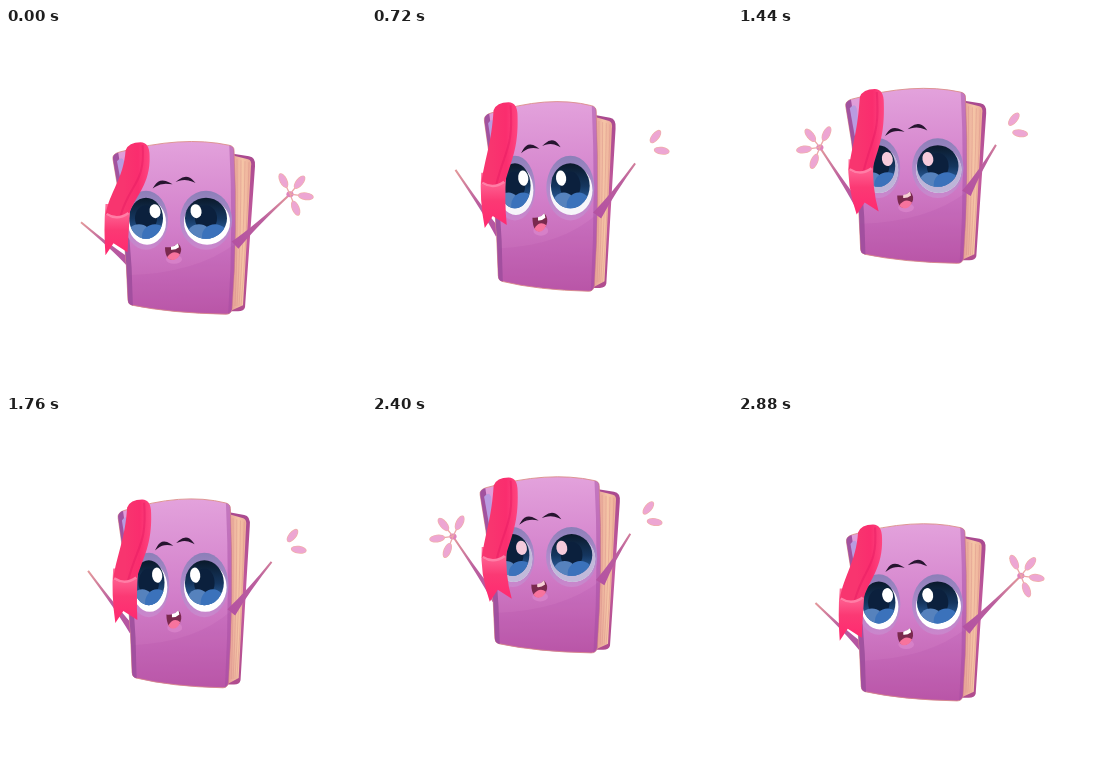
These frames come from a looping animation (360x360 px, 2960 ms). An HTML page with a canvas:

```html
<!DOCTYPE html>
<html lang="en">
<head>
<meta charset="utf-8">
<title>Bouncing book</title>
<style>
  html, body { margin: 0; width: 100%; height: 100%; overflow: hidden; background: #fff; }
  canvas { display: block; width: 100vmin; height: 100vmin; }
</style>
</head>
<body>
<canvas id="stage"></canvas>
<script>
const canvas = document.getElementById('stage');
const ctx = canvas.getContext('2d');
const density = Math.max(1, window.devicePixelRatio || 1);
canvas.width = canvas.height = 360 * density;

const LOOP = 2960, STEP = 80, BOUNCES = 3, TAU = Math.PI * 2;

function gradient(x0, y0, x1, y1, ...colors) {
  const g = ctx.createLinearGradient(x0, y0, x1, y1);
  colors.forEach((c, i) => g.addColorStop(i / (colors.length - 1), c));
  return g;
}

function shape(d, fill, stroke, width = 1) {
  const path = new Path2D(d);
  if (fill) { ctx.fillStyle = fill; ctx.fill(path); }
  if (stroke) { ctx.strokeStyle = stroke; ctx.lineWidth = width; ctx.stroke(path); }
}

function oval(x, y, rx, ry, fill, angle = 0) {
  ctx.beginPath();
  ctx.ellipse(x, y, rx, ry, angle, 0, TAU);
  ctx.fillStyle = fill;
  ctx.fill();
}

function eye(x, rx, lightX, dim) {
  oval(x, 192, rx, 29.5, gradient(0, 162, 0, 222, '#8b7fb8', '#ae8bcb', '#cc86cc'));
  oval(x + 1, 194, rx - 3, 22.5, '#fff');
  ctx.globalAlpha = dim * .8;
  oval(x + 1, 194, rx - 3, 22.5, '#aaa0cd');
  ctx.globalAlpha = 1;
  ctx.save();
  ctx.beginPath();
  ctx.ellipse(x, 190, rx - 5, 20.5, 0, 0, TAU);
  ctx.clip();
  ctx.fillStyle = gradient(0, 170, 0, 211, '#0a1a2c', '#15365f', '#3470b8');
  ctx.fillRect(x - 30, 165, 60, 50);
  oval(x, 190, 11, 13, '#0b203d');
  oval(x - 7, 207, 12, 11, '#5682bd');
  oval(x + 9, 208, 13, 12, '#3b72bb');
  ctx.restore();
  oval(lightX, 183, 5.5, 7, dim > .4 ? '#f6cbdc' : '#fff', -.2);
}

function pages() {
  shape('M224 125 L243 128 Q250 129 249 138 L239 279 Q238 283 232 283 L222 283Z',
    gradient(0, 125, 0, 283, '#a9498f', '#c45b9e', '#b04c8e'));
  shape('M226 127 L242 131 Q246 132 245 138 L237 277 L226 282Z',
    gradient(226, 0, 247, 0, '#e59f97', '#f5c5a6', '#eaa695'));
  for (let i = 0; i < 4; i++)
    shape(`M${231 + i * 4} ${131 + i} Q${232 + i * 3} 210 ${229 + i * 2} 278`, null, '#d58a8488', .7);
}

function cover() {
  const outline = 'M113 124 Q176 107 223 117 Q228 118 228 122 Q232 202 226 281 Q225 286 220 286 ' +
    'Q165 285 126 277 Q122 276 122 272 Q120 200 107 131 Q106 126 113 124Z';
  shape(outline, gradient(180, 113, 185, 286, '#e3a2dc', '#d27fca', '#bc59a9'), '#dc8f8a', .9);
  ctx.save();
  ctx.clip(new Path2D(outline));
  shape('M105 125 L112 123 Q126 200 127 280 L120 280 Q120 195 105 125Z', '#a1529f');
  shape('M111 133 Q116 127 118 133 L121 160 L116 160Z', '#b99be0');
  shape('M122 247 Q190 245 230 215 L230 290 L122 282Z', '#a7419f22');
  shape('M223 112 Q228 200 222 288 L235 288 L232 112Z', '#a04a9f77');
  ctx.restore();
}

function face(dim) {
  eye(140, 22, 149, dim);
  eye(200, 26, 190, dim);
  shape('M149 158 Q154 150 163 155 Q155 154 149 158Z', '#26152f', '#26152f', 1.4);
  shape('M173 152 Q181 146 187 153 Q180 150 173 152Z', '#26152f', '#26152f', 1.4);
  oval(168, 231, 8, 4.5, '#d680c8');
  shape('M159 219 Q167 220 172 215 Q177 220 174 226 Q168 234 162 230 Q159 226 159 219Z', '#7a294e');
  shape('M161 229 Q167 221 174 226 Q170 234 163 231Z', '#f7739d');
  shape('M165 218.5 Q169 218 172 215 L173 219 Q169 222 165 221.5Z', dim > .4 ? '#f6d0d5' : '#fff');
}

// Limb that narrows from the shoulder toward the hand
function arm(sx, sy, hx, hy, reach, thick) {
  const dx = hx - sx, dy = hy - sy, len = Math.hypot(dx, dy);
  const nx = -dy / len, ny = dx / len;
  const ex = sx + dx * reach, ey = sy + dy * reach;
  const mx = sx + dx * .35, my = sy + dy * .35;
  shape(`M${sx + nx * thick} ${sy + ny * thick} Q${mx + nx} ${my + ny} ${ex + nx} ${ey + ny}
    L${ex - nx} ${ey - ny} Q${mx - nx} ${my - ny} ${sx - nx * thick} ${sy - ny * thick}Z`,
    gradient(sx, sy, hx, hy, '#b452a2', '#bb5f9e', '#e49a9b'));
}

// Petal-like fingers fanned around the palm; side is 1 for right, -1 for left
function hand(x, y, side, first, count) {
  if (count > 3) oval(x, y, 3.6, 3, '#df83bd');
  for (let i = first; i < first + count; i++) {
    const angle = -2 + i * 1.07;
    const dx = Math.cos(angle) * side * 16, dy = Math.sin(angle) * 15;
    const tilt = Math.atan2(dy, dx);
    if (count > 3) shape(`M${x} ${y} l${dx * .6} ${dy * .6}`, null, '#eba7a8', 1.3);
    oval(x + dx, y + dy, 8, 3.9, '#f0b0a6', tilt);
    oval(x + dx, y + dy, 7.3, 3.2, '#eda6d3', tilt);
  }
}

function ribbon(top, bendX, endX, length) {
  const y = top + 4, midY = y + length * .36, bendY = y + length * .68, endY = y + length;
  const x = 131.5 + (bendX - 111) * .2, midX = bendX + 9;
  // Lower piece hangs behind the upper one
  shape(`M${bendX - 12} ${bendY - 14} Q${bendX - 14} ${bendY + 12} ${endX - 10} ${endY + 3}
    L${endX - 2} ${endY - 9} L${endX + 12} ${endY}
    Q${bendX + 11} ${bendY + 14} ${bendX + 13} ${bendY - 14}Z`,
    gradient(0, bendY - 10, 0, endY, '#ff6f9c', '#fb3974', '#ff2a70'));
  shape(`M${x - 12} ${y + 5} Q${x - 9} ${y - 3} ${x + 3} ${y - 3} Q${x + 12} ${y - 3} ${x + 12} ${y + 11}
    C${x + 13} ${midY} ${midX + 9} ${midY + 12} ${bendX + 12} ${bendY - 5}
    Q${bendX} ${bendY + 4} ${bendX - 12} ${bendY - 3}
    C${midX - 17} ${midY + 8} ${x - 14} ${midY - 5} ${x - 12} ${y + 5}Z`,
    gradient(x - 14, 0, x + 15, 0, '#f8356f', '#fa2d6e', '#ff4b85'));
  shape(`M${x + 5} ${y} C${x + 8} ${midY} ${midX + 3} ${midY} ${bendX + 3} ${bendY - 2}`,
    null, '#e0175f66', 2);
  shape(`M${bendX - 11} ${bendY - 4} Q${bendX} ${bendY + 3} ${bendX + 11} ${bendY - 5}`,
    null, '#ff7ea6', 2.5);
}

function draw(time) {
  const held = Math.floor(time % LOOP / STEP) * STEP;
  const phase = held * BOUNCES / LOOP % 1;
  // c is 1 on the ground and -1 in the air; s is positive going up
  const c = Math.cos(phase * TAU), s = Math.sin(phase * TAU), c2 = Math.cos(phase * 2 * TAU);

  const top = 81.5 + 26.7 * c + 5 * c2;
  const height = 181 - c - 2.1 * s - 7 * c2;
  const scaleY = height / 173, scaleX = Math.sqrt(1 / scaleY) ** 1.7;
  const bodyX = x => 178 + (x - 178) * scaleX;
  const bodyY = y => top + (y - 113) * scaleY;
  const rightX = 275 + 9 * c, rightY = top + 48 + 5 * c;
  const leftX = 79 - 4 * c - 4 * s, leftY = top + 70 + 11 * c;
  const falling = phase > .42 && phase < .85;
  const leftFingers = Math.round(4 * Math.max(0, Math.cos((phase - .43) * TAU)));

  ctx.setTransform(density, 0, 0, density, 0, 0);
  ctx.fillStyle = '#fff';
  ctx.fillRect(0, 0, 360, 360);
  arm(bodyX(123), bodyY(234), leftX, leftY, 1, 4);
  hand(leftX, leftY, -1, 0, leftFingers);

  ctx.save();
  ctx.translate(178, top);
  ctx.scale(scaleX, scaleY);
  ctx.translate(-178, -113);
  pages();
  cover();
  face(Math.max(0, -c));
  ctx.restore();

  arm(bodyX(229), bodyY(217), rightX, rightY, falling ? .78 : 1, 5);
  hand(rightX, rightY, 1, falling ? 1 : 0, falling ? 2 : 4);
  ribbon(top, 117.5 - 6 * c - 3 * s, 119.5 - 10 * c - 2 * s, 114 - 7 * c - 5 * s);
}

function tick() {
  draw(performance.now());
  requestAnimationFrame(tick);
}
tick();
</script>
</body>
</html>
```
